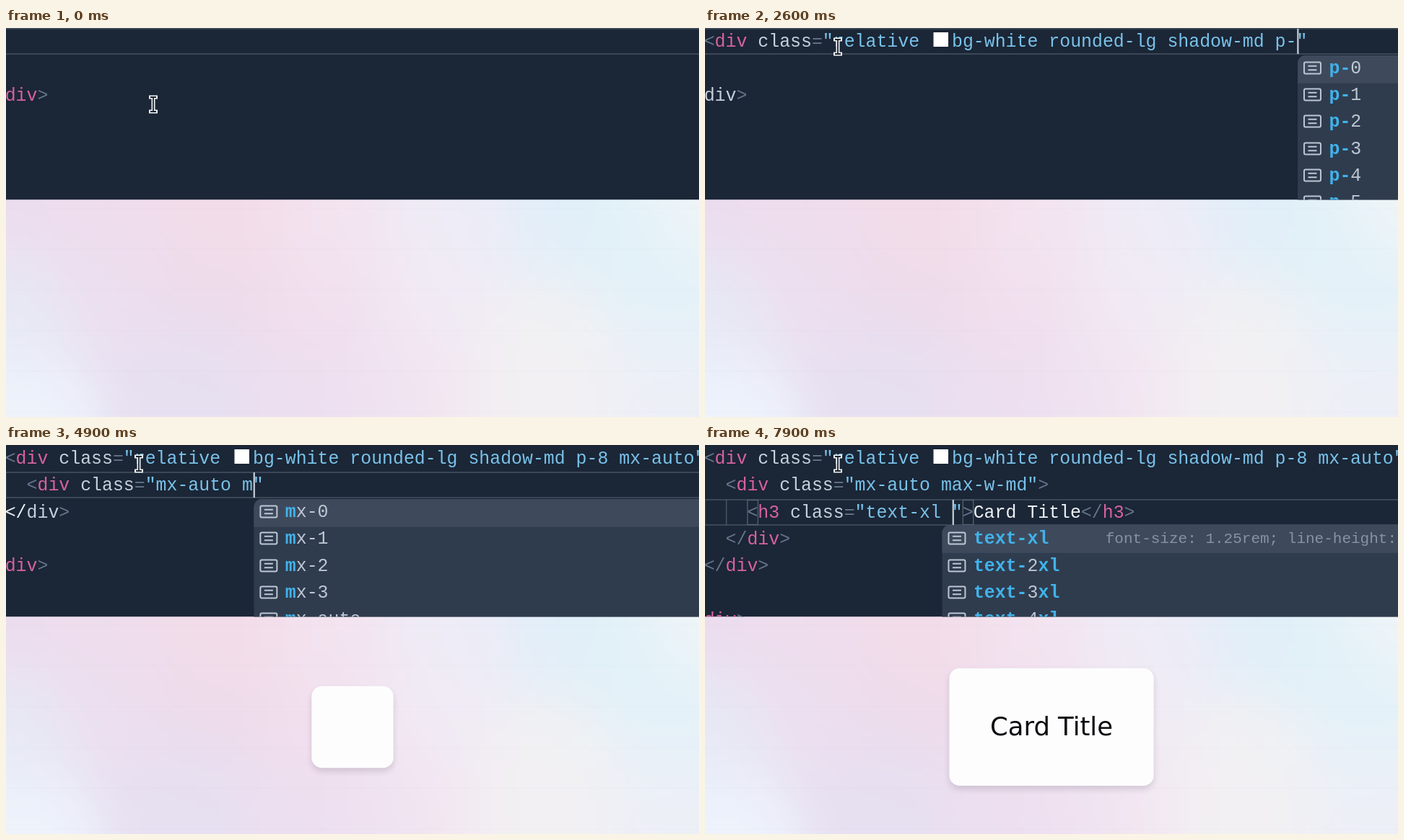
Recreate the animation shown at these times as an HTML page with a canvas. Size 960 by 540 pixels, loop 8 s.

```html
<!DOCTYPE html>
<html lang="en">
<head>
<meta charset="utf-8">
<title>Live card editor</title>
<style>
  html, body { margin: 0; width: 100%; height: 100%; overflow: hidden; background: #1b2636; }
  canvas { display: block; }
</style>
</head>
<body>
<canvas id="stage" width="960" height="540"></canvas>
<script>
const ctx = document.getElementById('stage').getContext('2d');
const STEP_MS = 100, STEPS = 80;
const SPLIT = 238.5, ROW = 37.25, ADV = 14.92, LEFT = -1.3, SWATCH = 30, SCALE = 1.77;
const MONO = '"Liberation Mono", monospace';
const CODE = `24.87px ${MONO}`, BOLD = `bold ${CODE}`, SMALL = `21px ${MONO}`;
const COLOR = {
  bg: '#1b2636', band: '#3b4656', guide: '#4a5564', caret: '#c8d0da',
  punct: '#64748b', tag: '#d6629f', attr: '#c6d0dc', string: '#79c2e9', text: '#eef2f6',
  popup: '#2f3c4e', selected: '#3e4a5c', item: '#bdc7d3', match: '#41b2ea',
  detail: '#8793a3', orange: '#d9932f'
};

// One entry per step; "\n" is Enter, "@" puts the caret back inside the h3 tag.
const KEYS = ('||<|d|iv| c|lass="|re|lat|ive| |b|g-|wh|ite| |r|ou|nded|-lg| |s|had|ow-md| |p|-|8' +
  '| |m|x|-|a|u|to|">|\n||||<|div| class=|"|m|x-|a|uto| |m|ax|-w|-m|d|">|\n|<' +
  '|h|3|>|C|a|r|d |Ti|t|le|@|| |c|l|a|ss|="||te|xt-|xl| ').split('|');

const POOL = {
  tag: '/div a abbr address dd del details div h3 hr html'.split(' '),
  attr: 'class aria-colcount aria-colindex aria-colspan'.split(' '),
  name: ('relative bg-white bg-black bg-blue-50 bg-gray-50 rounded rounded-lg rounded-md rounded-full ' +
    'shadow shadow-md shadow-lg shadow-xl p-0 p-1 p-2 p-3 p-4 p-5 p-6 p-8 mx-0 mx-1 mx-2 mx-3 mx-auto ' +
    'max-w-xs max-w-sm max-w-md max-w-lg max-w-xl text-xl text-2xl text-3xl text-4xl').split(' ')
};
const DETAIL = {
  'relative': 'position: relative;',
  'text-xl': 'font-size: 1.25rem; line-height: 1.75rem;'
};

function edit(step) {
  const above = [], below = ['', '</div>'];
  let before = '', after = '', moved = false;
  for (const c of KEYS.slice(0, step + 1).join('')) {
    if (c === '\n') {
      above.push(before);
      below.unshift('  '.repeat(above.length - 1) + after);
      before = '  '.repeat(above.length);
      after = '';
    } else if (c === '@') {
      before = '    <h3';
      after = '>Card Title</h3>';
      moved = true;
    } else {
      before += c;
      if (c === '"') after = after[0] === '"' ? after.slice(1) : '"' + after;
      if (c === '>') after = `</${before.match(/<(\w+)/)[1]}>`;
    }
  }
  return { above, before, after, below, moved, row: above.length };
}

const colX = (line, col) => LEFT + col * ADV + (col > 20 && line.includes('bg-white') ? SWATCH : 0);
const baseline = row => 26 + row * ROW;

function glyphs(str, x, y, color, font = CODE) {
  ctx.font = font;
  ctx.fillStyle = color;
  ctx.fillText(str, x, y);
}

function box(x, y, w, h, radius, color) {
  ctx.beginPath();
  ctx.roundRect(x, y, w, h, radius);
  ctx.fillStyle = color;
  ctx.fill();
}

function drawLine(line, row, shift = 0, broken = false) {
  const y = Math.round(baseline(row));
  let inTag = false, naming = false, quoted = false;
  [...line].forEach((c, i) => {
    let color = COLOR.text;
    if (c === '"') { quoted = !quoted; color = COLOR.string; }
    else if (quoted) color = COLOR.string;
    else if (c === '<' || (c === '/' && line[i - 1] === '<')) {
      inTag = naming = true;
      color = broken ? COLOR.text : COLOR.punct;
    } else if (c === '>') { inTag = false; color = COLOR.punct; }
    else if (inTag) {
      if (c === ' ') naming = false;
      color = c === '=' ? COLOR.punct : naming && !broken ? COLOR.tag : COLOR.attr;
    }
    if (c !== ' ') glyphs(c, colX(line, i) + shift * ADV, y, color);
  });
  if (line.includes('bg-white')) box(316.5, 6, 20.5, 20, 0, '#fff');
}

// Completion context: which pool, the typed query and the column it is anchored to.
function completion({ before, after }) {
  const open = before.match(/<([^<>]*)$/);
  if (!open) return null;
  const typed = open[1], quotes = typed.split('"').length - 1;
  if (quotes === 1) {
    const name = typed.match(/([\w-]+) ?$/);
    return name && { kind: 'name', query: name[1], col: before.trimEnd().length };
  }
  const col = before.length;
  if (/^\w*$/.test(typed)) return after ? null : { kind: 'tag', query: typed, col };
  const attr = typed.match(/ (\w+)$/);
  return attr && { kind: 'attr', query: attr[1], col };
}

function matches(item, query) {
  const hits = [];
  let at = -1;
  for (const c of query) {
    at = item.indexOf(c, at + 1);
    if (at < 0) return null;
    hits.push(at);
  }
  return hits;
}

const WRENCH = new Path2D('M14.7 6.3a1 1 0 0 0 0 1.4l1.6 1.6a1 1 0 0 0 1.4 0l3.77-3.77a6 6 0 0 1-7.94 7.94' +
  'l-6.91 6.91a2.12 2.12 0 0 1-3-3l6.91-6.91a6 6 0 0 1 7.94-7.94l-3.76 3.76z');

function noteIcon(x, y, w, h, inset, gap) {
  ctx.beginPath();
  ctx.roundRect(x, y, w, h, 2);
  for (const dy of [-gap, gap]) {
    ctx.moveTo(x + inset, y + h / 2 + dy);
    ctx.lineTo(x + w - inset, y + h / 2 + dy);
  }
  ctx.stroke();
}

function drawIcon(kind, x, y, color) {
  ctx.save();
  ctx.translate(x, y);
  ctx.strokeStyle = color;
  ctx.lineWidth = 2;
  if (kind === 'name') noteIcon(-11.5, -8, 23, 16, 5.5, 2.7);
  else if (kind === 'attr') {
    noteIcon(-1, -9, 12, 11, 3, 1.8);
    ctx.fillStyle = COLOR.popup;
    ctx.fillRect(-12, -2, 14, 11);
    noteIcon(-12, -2, 13, 11, 3, 1.8);
  } else {
    ctx.scale(1.2, 1.2);
    ctx.translate(-12, -12);
    ctx.lineWidth = 1.6;
    ctx.stroke(WRENCH);
  }
  ctx.restore();
}

function drawPopup(state) {
  const info = completion(state);
  if (!info) return;
  const { kind, query, col } = info;
  const items = POOL[kind]
    .filter(item => matches(item, query) && (kind === 'attr' || !query || item[0] === query[0]))
    .slice(0, 6);
  if (!items.length) return;
  const x = colX(state.before, col) + 1.5, width = 763;
  const top = Math.floor(38 + state.row * ROW) - (state.row > 1 ? 1 : 0);
  const height = items.length * ROW + 2;
  box(x, top, width, height, 11, COLOR.popup);
  box(x, top, width, ROW + 1.5, items.length > 1 ? [11, 11, 0, 0] : 11, COLOR.selected);
  if (kind === 'tag' && !query) box(x + width - 17, top, 17, 49, [0, 11, 0, 0], '#525e6e');
  items.forEach((item, i) => {
    const y = Math.floor(baseline(state.row + 1 + i)), hits = matches(item, query);
    drawIcon(kind, x + 20.5, y - 7.5, kind === 'attr' && i ? COLOR.orange : COLOR.item);
    [...item].forEach((c, n) => {
      const hit = hits.includes(n);
      glyphs(c, x + 43.5 + n * ADV, y, hit ? COLOR.match : COLOR.item, hit ? BOLD : CODE);
    });
    if (!i && DETAIL[item]) {
      ctx.textAlign = 'right';
      glyphs(DETAIL[item], x + 743, y - 1, COLOR.detail, SMALL);
      ctx.textAlign = 'left';
    }
  });
}

function drawPointer(step) {
  const [x, y] = [[204, 106], [193, 62]][step] || [184, 26];
  const stroke = (color, width, grow) => {
    ctx.beginPath();
    for (const s of [-1, 1]) {
      ctx.moveTo(x - 4 - grow, y + s * 10);
      ctx.lineTo(x + 4 + grow, y + s * 10);
    }
    ctx.moveTo(x, y - 10);
    ctx.lineTo(x, y + 10);
    ctx.strokeStyle = color;
    ctx.lineWidth = width;
    ctx.stroke();
  };
  stroke('#f1f3f6', 5, 2);
  stroke('#1c2430', 1.8, 0);
}

function drawEditor(step) {
  const state = edit(step), { above, before, after, below, moved, row } = state;
  ctx.save();
  ctx.beginPath();
  ctx.rect(0, 0, 960, SPLIT);
  ctx.clip();
  ctx.fillStyle = COLOR.bg;
  ctx.fillRect(0, 0, 960, SPLIT);

  const top = Math.round(row * ROW);
  ctx.fillStyle = COLOR.band;
  ctx.fillRect(0, top, 960, 2);
  ctx.fillRect(0, top + 35, 960, 2);
  ctx.fillStyle = COLOR.guide;
  for (let k = 0; k < row; k++) ctx.fillRect(k * 2 * ADV - 1, top + 1, 1.5, 35);

  above.forEach((line, i) => drawLine(line, i));
  drawLine(before + after, row);
  const unclosed = /<\w[^>]*$/.test(before) && !after.includes('>');
  const firstClose = below.findIndex(line => line);
  below.forEach((line, i) =>
    drawLine(line, row + 1 + i, i === below.length - 1 ? -2 : 0, unclosed && i === firstClose));

  if (moved) {
    ctx.strokeStyle = '#5b6675';
    ctx.lineWidth = 1.2;
    for (const col of [4, before.length + after.indexOf('>')])
      ctx.strokeRect(colX(before, col) + 0.5, top + 1.5, ADV - 0.5, 34);
  }
  drawPopup(state);
  if (step) {
    ctx.fillStyle = COLOR.caret;
    ctx.fillRect(colX(before, before.length) + 0.8, top + 1, 2.2, 35);
  }
  drawPointer(step);
  ctx.restore();
}

// Pastel backdrop: a smooth blend of a few colour anchors.
const ANCHORS = [
  [0, 240, 0xecdcee], [150, 260, 0xefdcec], [300, 270, 0xf5dce8], [450, 290, 0xf3e4f0],
  [620, 270, 0xeeecf6], [770, 270, 0xe0eef9], [880, 290, 0xdff1f8], [960, 240, 0xf5f6f7],
  [0, 390, 0xe6e9f5], [150, 360, 0xecdff0], [280, 350, 0xeddaea], [430, 390, 0xf1deed],
  [600, 370, 0xf1ebf5], [760, 420, 0xf2f1f3], [930, 380, 0xe3f1f9], [0, 530, 0xeef3fc],
  [250, 470, 0xe6e0f1], [440, 520, 0xecdff0], [560, 490, 0xf2e4f1], [720, 510, 0xf2f0f2],
  [930, 490, 0xeeeff7]
];
const backdrop = (() => {
  const c = document.createElement('canvas'), w = c.width = 120, h = c.height = 38;
  const g = c.getContext('2d'), img = g.createImageData(w, h);
  for (let p = 0; p < w * h; p++) {
    const x = (p % w + 0.5) * 8, y = SPLIT + (Math.floor(p / w) + 0.5) * 8;
    const sum = [0, 0, 0];
    let total = 0;
    for (const [ax, ay, rgb] of ANCHORS) {
      const weight = Math.exp(-((x - ax) ** 2 + (y - ay) ** 2) / 8500);
      total += weight;
      for (let k = 0; k < 3; k++) sum[k] += weight * (rgb >> (16 - 8 * k) & 255);
    }
    for (let k = 0; k < 3; k++) img.data[p * 4 + k] = sum[k] / total;
    img.data[p * 4 + 3] = 255;
  }
  g.putImageData(img, 0, 0);
  return c;
})();

function cardText(step) {
  if (step >= 41 && step <= 43) return '<';
  const { before, row, moved } = edit(step - 1);
  if (moved) return 'Card Title';
  const typed = row === 2 && before.match(/>([^<>]*)$/);
  return typed ? typed[1].trim() : '';
}

function drawPreview(step) {
  ctx.imageSmoothingQuality = 'high';
  ctx.drawImage(backdrop, 0, Math.floor(SPLIT), 960, 304);
  ctx.fillStyle = 'rgba(60, 60, 100, 0.02)';
  for (let y = 249.5; y < 540; y += 32 * SCALE) ctx.fillRect(0, y, 960, 1);
  if (step < 27) return;

  const text = cardText(step), large = step >= 79, midY = 391.5;
  const size = (large ? 20 : 16) * SCALE, pad = 64 * SCALE;
  ctx.font = `${size}px "DejaVu Sans", sans-serif`;
  const w = step < 34 ? 960 : pad + ctx.measureText(text).width;
  const h = pad + (text ? (large ? 28 : 24) * SCALE : 0);
  ctx.save();
  ctx.shadowColor = 'rgba(30, 20, 50, 0.14)';
  ctx.shadowOffsetY = 5;
  ctx.shadowBlur = 8;
  box(480 - w / 2, midY - h / 2, w, h, 8 * SCALE, '#fdfdfe');
  ctx.restore();
  ctx.fillStyle = '#0c0c10';
  ctx.textAlign = 'center';
  ctx.fillText(text, 480, Math.floor(midY + size * 0.346));
  ctx.textAlign = 'left';
}

let shown = -1;
function tick() {
  const step = Math.floor(performance.now() / STEP_MS) % STEPS;
  if (step !== shown) {
    shown = step;
    drawPreview(step);
    drawEditor(step);
  }
  requestAnimationFrame(tick);
}
tick();
</script>
</body>
</html>
```
